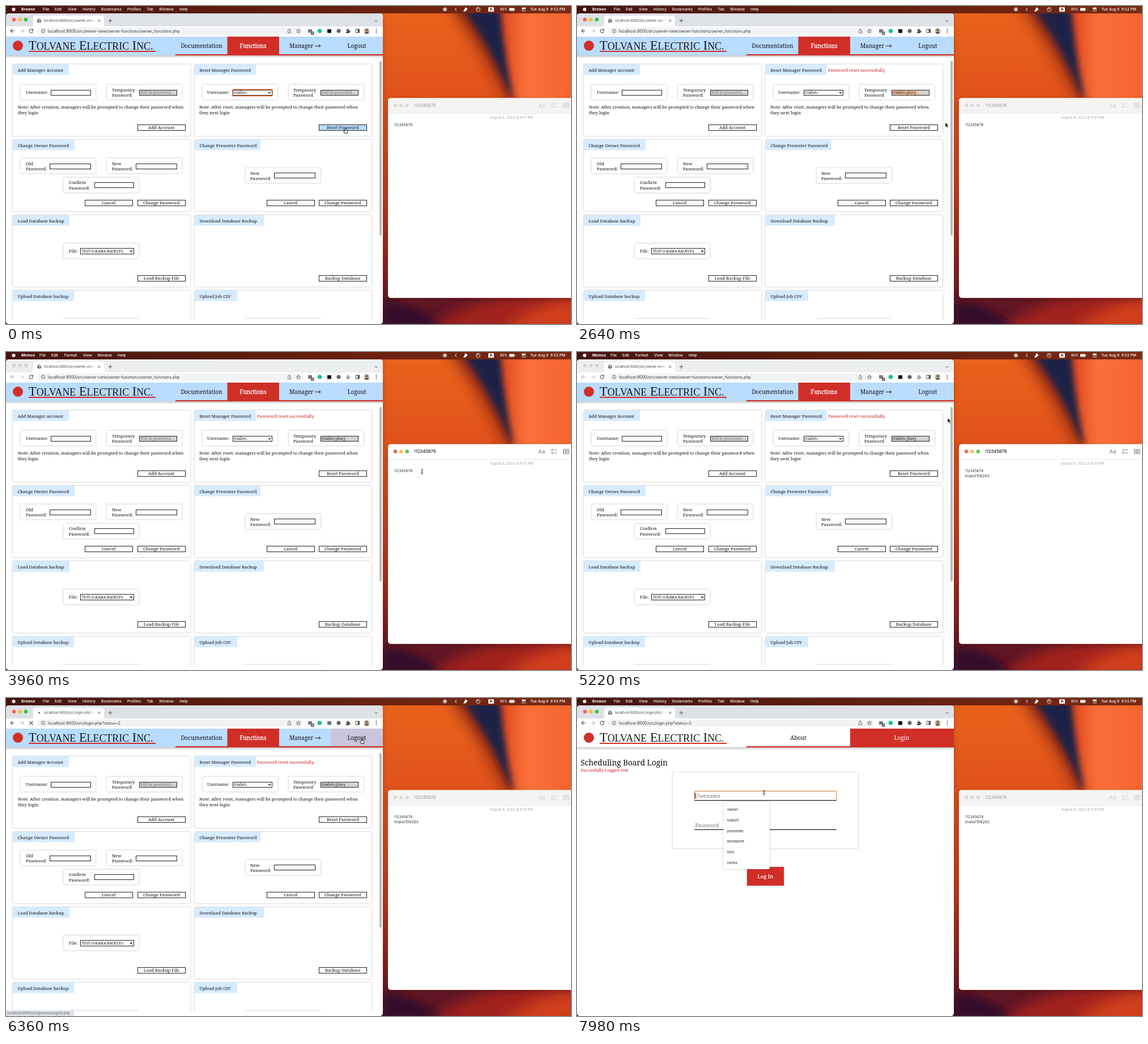
Write an HTML page that moves like this. It is 997 px wide and 561 px high and loops after 8 s.

```html
<!DOCTYPE html>
<html lang="en">
<head>
<meta charset="utf-8">
<title>Password reset</title>
<style>
html, body { margin: 0; width: 100%; height: 100%; overflow: hidden; background: #fff; }
svg { display: block; width: 997px; height: 561px; }
text { white-space: pre; }
.s { font-family: "Noto Serif", serif; font-variant-numeric: oldstyle-nums; }
.u { font-family: Inter, sans-serif; }
.t { font-family: "Liberation Serif", serif; }
</style>
</head>
<body>
<svg id="stage" viewBox="0 0 997 561" xmlns="http://www.w3.org/2000/svg"></svg>
<script>
const LOOP = 8000;
const RED = '#d02f27', SKY = '#b9dcff', INK = '#111';

const rect = (x, y, w, h, fill, more = '') =>
  `<rect x="${x}" y="${y}" width="${w}" height="${h}" fill="${fill}" ${more}/>`;
const dot = (x, y, r, fill, more = '') =>
  `<circle cx="${x}" cy="${y}" r="${r}" fill="${fill}" ${more}/>`;
const line = (d, color, w = 1, more = '') =>
  `<path d="${d}" fill="none" stroke="${color}" stroke-width="${w}" ${more}/>`;
const shape = (d, fill, more = '') => `<path d="${d}" fill="${fill}" ${more}/>`;
const text = (x, y, size, str, fill = INK, cls = 's', more = '') =>
  `<text class="${cls}" x="${x}" y="${y}" font-size="${size}" fill="${fill}" ${more}>${str}</text>`;
const mid = (x, y, size, str, fill = INK, more = '') =>
  text(x, y, size, str, fill, 's', `text-anchor="middle" ${more}`);
const ui = (x, y, size, str, fill = INK, more = '') => text(x, y, size, str, fill, 'u', more);
const group = (id, body, more = '') => `<g id="${id}" ${more}>${body}</g>`;

const defs = `<defs>
  <filter id="soft" x="-20%" y="-20%" width="140%" height="140%"><feDropShadow dx="0" dy="0" stdDeviation="1.7" flood-opacity=".3"/></filter>
  <filter id="win" x="-10%" y="-10%" width="120%" height="120%"><feDropShadow dx="0" dy="3" stdDeviation="5" flood-opacity=".22"/></filter>
  <filter id="b6" x="-50%" y="-50%" width="200%" height="200%"><feGaussianBlur stdDeviation="6"/></filter>
  <filter id="b12" x="-50%" y="-50%" width="200%" height="200%"><feGaussianBlur stdDeviation="12"/></filter>
  <linearGradient id="wall" x1="0" y1="0" x2="0" y2="1">
    <stop offset="0" stop-color="#ea641c"/><stop offset=".28" stop-color="#e0521a"/>
    <stop offset=".6" stop-color="#c53a1a"/><stop offset=".85" stop-color="#80201f"/><stop offset="1" stop-color="#4a1028"/>
  </linearGradient>
  <linearGradient id="petal" x1="0" y1="0" x2="1" y2="0">
    <stop offset="0" stop-color="#e0451c"/><stop offset=".35" stop-color="#f9713a"/><stop offset="1" stop-color="#f4622c"/>
  </linearGradient>
  <linearGradient id="bar"><stop offset="0" stop-color="#45140f"/><stop offset=".65" stop-color="#6b2210"/><stop offset="1" stop-color="#782a14"/></linearGradient>
  <linearGradient id="fade" x1="0" y1="0" x2="1" y2="0"><stop offset="0" stop-color="#fff" stop-opacity="0"/><stop offset="1" stop-color="#fff"/></linearGradient>
  <linearGradient id="drop" x1="0" y1="0" x2="0" y2="1"><stop offset="0" stop-opacity=".22"/><stop offset="1" stop-opacity="0"/></linearGradient>
  <clipPath id="page"><rect y="54" width="665" height="499"/></clipPath>
  <clipPath id="right"><rect x="655" y="0" width="342" height="561"/></clipPath>
</defs>`;

function wallpaper() {
  return rect(0, 0, 997, 561, '#5b1518') + `<g clip-path="url(#right)">` +
    rect(655, 0, 342, 561, 'url(#wall)') +
    shape('M775 -10Q845 80 885 170H930L905 -10Z', '#8a2719', 'filter="url(#b12)"') +
    shape('M795 -10Q850 60 888 150L905 165Q882 80 880 -10Z', '#1d2347', 'filter="url(#b6)"') +
    shape('M872 -10Q880 92 900 180H1010V-10Z', 'url(#petal)', 'filter="url(#b6)"') +
    shape('M735 575Q830 500 1010 500V575Z', '#a3231b', 'filter="url(#b12)"') +
    shape('M870 575Q930 525 1010 515V575Z', '#d2401c', 'filter="url(#b12)"') +
    shape('M668 520Q730 528 765 565H668Z', '#35102c', 'filter="url(#b6)"') + '</g>';
}

function menu(id, names, xs) {
  return group(id, names.map((n, i) =>
    ui(xs[i], 8.4, 6.7, n, '#fff', `font-weight="${i ? 500 : 700}"`)).join(''));
}

function menuBar() {
  return rect(0, 0, 997, 13, 'url(#bar)') + dot(13.5, 6, 3, '#fff') +
    menu('menuWeb', ['Browse', 'File', 'Edit', 'View', 'History', 'Bookmarks', 'Profiles', 'Tab', 'Window', 'Help'],
      [27, 65, 86, 109, 135, 168, 214, 248, 270, 306]) +
    menu('menuMemo', ['Memos', 'File', 'Edit', 'Format', 'View', 'Window', 'Help'], [27, 59, 80, 103, 136, 161, 197]) +
    dot(774.5, 6, 3, 'none', 'stroke="#fff"') + rect(773, 4.5, 3, 3, '#fff') +
    line('M795 3L792.500 6L795 9', '#fff') +
    shape('M811 2L815 6L813 6.500L811.500 9L807 10L809 5.500Z', '#fff') +
    dot(833, 6, 3.5, 'none', 'stroke="#fff" stroke-width=".8"') + line('M831 4L833 6V3', '#fff', .8) +
    rect(851, 2, 10, 8, '#fff', 'rx="1.5"') + ui(853.7, 8.4, 6.5, 'A', '#4b1214', 'font-weight="700"') +
    ui(872, 8.2, 5.6, '80%', '#fff', 'font-weight="500"') +
    rect(888, 3.5, 9, 5, '#fff', 'rx="1"') + line('M898.300 5V7', '#fff', .8) +
    rect(910, 2.8, 7, 2.8, '#fff', 'rx="1.4"') + rect(910.3, 6.8, 6.4, 2.4, 'none', 'rx="1.2" stroke="#fff" stroke-width=".6"') +
    ui(925, 8.4, 6.6, 'Tue Aug 8  9:52 PM', '#fff', 'font-weight="500"');
}

const lights = (x, y, gap, r, colors) => colors.map((c, i) => dot(x + i * gap, y, r, c)).join('');
const LIT = ['#ff5f57', '#febc2e', '#28c840'];
const LIT2 = ['#ed6a5e', '#f4bf50', '#61c554'];
const dim = c => [c, c, c];

function arrows(back, next) {
  const head = (x, d) => `M${x + 3.3 * d} 44H${x - 3.3 * d}M${x} 41L${x - 3.3 * d} 44L${x} 47`;
  return line(head(11.5, 1), back, 1.1) + line(head(28, -1), next, 1.1);
}

function toolbar() {
  const g = '#4e5256';
  return rect(0, 13, 665, 28, '#dee1e6', 'rx="5" id="strip"') +
    group('webOn', lights(14, 24, 10.5, 3.3, LIT)) + group('webOff', lights(14, 24, 10.5, 3.1, dim('#cfd1d4'))) +
    shape('M45 36Q48 36 48 32V21Q48 17 52 17H169Q173 17 173 21V32Q173 36 176 36Z', '#fff') +
    group('globe', dot(58.5, 26, 3.6, '#5f6368') + line('M55.500 25H58L59 27L58 29M59.500 23V25H62', '#fff', .9)) +
    group('load', dot(58.5, 26, 1.6, '#5f6368')) +
    group('tabA', ui(67, 28.2, 6, 'localhost:8000/src/owner-view', '#45494d')) +
    group('tabB', ui(67, 28.2, 6, 'localhost:8000/src/login.php?s', '#45494d')) +
    rect(144, 19, 14, 14, 'url(#fade)') + rect(158, 19, 12, 14, '#fff') +
    line('M162.500 24L166.500 28M166.500 24L162.500 28', g, .9) +
    line('M184 22.500V29.500M180.500 26H187.500', g) + line('M650.500 25L653 27.500L655.500 25', g) +
    rect(0, 36, 665, 18, '#fff') + rect(55, 38, 469, 12.5, '#f1f3f4', 'rx="6.2"') +
    group('navOn', arrows('#4e5256', '#bfc1c4')) + group('navOff', arrows('#b4b6b9', '#cfd1d4')) +
    group('reload', line('M47 42A3.300 3.300 0 1 0 47.500 45', g, 1.1) + shape('M48 40V43.500H44.500Z', g)) +
    group('stop', line('M41.500 41L47.500 47M47.500 41L41.500 47', g, 1.1)) +
    dot(65.5, 44, 3.2, 'none', `stroke="${g}" stroke-width=".8"`) + line('M65.500 43.500V46M65.500 42V42.800', g, .8) +
    group('urlA', ui(74, 46.5, 7, 'localhost:8000/src/owner-view/owner-functions/owner_functions.php', '#33363a')) +
    group('urlB', ui(74, 46.5, 7, 'localhost:8000/src/login.php?status=2', '#33363a')) +
    line('M498 43H497.500V47.500H502.500V43H502M500 45V40.500M498.300 42L500 40.300L501.700 42', g, .8) +
    shape('M516 40.500L517 43H519.700L517.600 44.700L518.400 47.300L516 45.800L513.600 47.300L514.400 44.700L512.300 43H515Z', 'none', `stroke="${g}" stroke-width=".8"`) +
    rect(533, 41, 7, 6, '#77797c') + rect(538, 45, 5.5, 6, '#5b5e62', 'rx="1"') + ui(539.2, 50, 5, '8', '#fff') +
    dot(553.5, 44, 3.8, '#15c39a') + rect(567, 41, 7, 6.5, '#111', 'id="ext"') +
    dot(587, 44, 3.5, '#5f6368') +
    shape('M600 42H602Q601.500 40 603 40Q604.500 40 604 42H606V44Q608 43.500 608 45Q608 46.500 606 46V48H600V45.500Q602 45.500 602 44.500Q602 43.500 600 43.500Z', g, 'id="puzzle"') +
    rect(617, 41, 6.5, 6, 'none', `stroke="${g}"`) + rect(620.5, 41, 3, 6, g) +
    dot(636.5, 44, 5.2, '#c9b8a4') + dot(636.5, 42.5, 2, '#6b5444') + shape('M632.500 47.500Q636.500 43 640.500 47.500Q636.500 50.500 632.500 47.500Z', '#6b5444') +
    [41, 44, 47].map(y => dot(653.5, y, .9, g)).join('');
}

function brand() {
  const big = 22.4, sm = 17.9;
  const word = (a, b) => `<tspan font-size="${big}">${a}</tspan><tspan font-size="${sm}">${b}</tspan>`;
  return dot(21, 70, 9, RED) + rect(40, 79, 224, 2, RED) +
    text(40, 76.8, big, word('T', 'OLVANE') + word(' E', 'LECTRIC') + word(' I', 'NC.'), '#15171c', 't');
}

const box = (x, y, w = 132, h = 26) => rect(x, y, w, h, '#fff', 'filter="url(#soft)"');
const field = (x, y, w, fill = '#fff', h = 9) => rect(x + .5, y + .5, w - 1, h, fill, 'stroke="#222" stroke-width="1"');
const button = (x, y, label, id = '') =>
  rect(x + .5, y + .5, 84, 10, '#fff', `stroke="#222" stroke-width="1" ${id && `id="${id}"`}`) + mid(x + 42.3, y + 8.4, 7.7, label);
const two = (x, y, a, b) => text(x, y, 7.64, a) + text(x, y + 9.5, 7.64, b);
const chevron = (x, y) => line(`M${x - 2} ${y - 1}L${x} ${y + 1}L${x + 2} ${y - 1}`, INK, 1.2);
const card = (x, y, w, title) => rect(x, y, x < 100 ? 313 : 312, 126, '#fff', 'filter="url(#soft)"') +
  rect(x, y, w, 18.5, '#d6ebff') + text(x + 8.5, y + 12.7, 7.64, title);

function note(x, when, next) {
  return text(x, 180.5, 7.64, `Note: After ${when}, managers will be prompted to change their password when`) +
    text(x, 190.5, 7.64, next);
}

function boardPage() {
  const ghost = x => field(x, 148, 67, '#d3d3d3') + text(x + 2, 155.2, 6.3, 'Will be generated...', '#777');
  const cards =
    card(12, 103, 99, 'Add Manager Account') + card(333, 103, 108, 'Reset Manager Password') +
    card(12, 236, 109, 'Change Owner Password') + card(333, 236, 116, 'Change Presenter Password') +
    card(12, 369, 100, 'Load Database backup') + card(333, 369, 122, 'Download Database Backup') +
    card(12, 502, 108, 'Upload Database backup') + card(333, 502, 75, 'Upload Job CSV') +
    box(26, 139) + box(178, 139) + box(347, 139) + box(499, 139) +
    box(26, 269) + box(178, 269) + box(102, 303) + box(423, 286) + box(102, 419) + box(102, 552) + box(423, 552);
  const forms =
    text(35, 155.4, 7.64, 'Username:') + field(79, 148, 71) + two(187, 150.5, 'Temporary', 'Password') + ghost(235) +
    note(21, 'creation', 'they login') + button(232, 209, 'Add Account') +
    text(355, 155.4, 7.64, 'Username:') + field(400, 148, 70) + text(402, 155.2, 6.3, 'trialist1') + chevron(465, 153) +
    group('ring', rect(400, 147.5, 70, 11, 'none', 'rx="1" stroke="#e0532b" stroke-width="1.3"')) +
    two(507, 150.5, 'Temporary', 'Password') + ghost(555) +
    group('made', rect(556, 149, 65, 8, '#d3d3d3') + rect(556.5, 149, 46.5, 8, '#f6c199', 'id="mark"') + text(557, 155.3, 6.3, 'trialist158203')) +
    group('done', text(443, 115.7, 7.64, 'Password reset successfully.', '#c81e1e')) +
    note(341, 'reset', 'they next login') + button(552, 209, 'Reset Password', 'reset') +
    two(35, 280.5, 'Old', 'Password:') + field(77, 278, 73) + two(187, 280.5, 'New', 'Password:') + field(229, 278, 73) +
    two(111, 314, 'Confirm', 'Password:') + field(156, 311, 70) +
    button(139, 342, 'Cancel') + button(232, 342, 'Change Password') +
    two(431, 297.5, 'New', 'Password:') + field(473, 294, 73) +
    button(460, 342, 'Cancel') + button(552, 342, 'Change Password') +
    text(111, 435.3, 7.64, 'File:') + field(131, 427, 95, '#fff', 10) + text(134, 434.8, 6.3, 'TEST-O-RAMA-BACKUP.s') +
    rect(217, 428, 8, 9, '#fff') + chevron(221, 432.5) +
    button(232, 475, 'Load Backup File') + button(552, 475, 'Backup Database');
  return cards + forms + rect(659, 97, 4, 308, '#b9b9b9', 'rx="2"') +
    rect(0, 87, 665, 5, 'url(#drop)') + rect(0, 54, 665, 33, SKY) +
    rect(573.5, 54, 91.5, 31, '#cac4dc', 'id="out"') + rect(299, 85, 366, 2.2, RED) + rect(390.5, 54, 91.5, 33, RED) +
    brand() + mid(345, 74, 9.95, 'Documentation') + mid(436, 74, 9.95, 'Functions', '#fff', 'stroke="#fff" stroke-width=".3"') +
    text(500, 74, 9.95, 'Manager') + line('M545 70.500H555M552 68L555 70.500L552 73', INK, .9) + mid(619, 74, 9.95, 'Logout');
}

function loginPage() {
  const names = ['owner', 'trialist1', 'presenter', 'testowner', 'tolvi', 'nerba'];
  return rect(0, 87, 665, 5, 'url(#drop)') + rect(0, 54, 665, 33, '#fff') + brand() +
    rect(299, 85, 183, 2.2, RED) + rect(482, 54, 183, 33, RED) +
    mid(390.5, 74, 9.95, 'About') + mid(573, 74, 9.95, 'Login', '#fff') +
    text(6.5, 118.8, 13.5, 'Scheduling Board Login') + text(6.5, 129.8, 7.64, 'Succesfully Logged Out', '#c81e1e') +
    box(169, 131.5, 327, 133.5) + text(208.5, 175.5, 9.15, 'Username', '#757575') + text(208.5, 227.5, 9.15, 'Password', '#757575') +
    rect(207, 180, 251, 1.3, '#222') + rect(207, 231.5, 251, 1.3, '#222') +
    rect(300, 298, 65, 33, RED, 'filter="url(#soft)"') + mid(332.3, 318, 9.2, 'Log In', '#fff', 'stroke="#fff" stroke-width=".2"') +
    group('focus', rect(207.3, 164.3, 250.4, 16.2, 'none', 'rx="1.5" stroke="#e08a50" stroke-width="1.2"') +
      rect(208, 180, 249, 1, '#222') + rect(208.2, 167, .8, 11, '#111') +
      rect(258.5, 183.5, 81.5, 118.5, '#fff', 'rx="2" filter="url(#soft)"') +
      names.map((n, i) => ui(265, 199.2 + i * 18.7, 6.4, n, '#222')).join(''));
}

function memoIcons(c) {
  return ui(939.5, 178.8, 9.3, 'Aa', c) +
    dot(964, 172.8, 1.5, 'none', `stroke="${c}" stroke-width=".8"`) + dot(964, 178, 1.5, 'none', `stroke="${c}" stroke-width=".8"`) +
    line('M967 172.800H972M967 178H972', c, .9) +
    rect(983.5, 171.8, 9.5, 7.5, 'none', `stroke="${c}" stroke-width=".9"`) + line('M983.500 174.300H993M983.500 176.800H993M988.200 171.800V179.300', c, .8);
}

function memoWindow() {
  const title = c => ui(720.5, 178.3, 7.4, '!12345678', c, 'font-weight="600"');
  return rect(674, 162.5, 340, 352.5, '#fff', 'rx="5" filter="url(#win)"') +
    group('memoOn', lights(687, 175.5, 10.4, 3.3, LIT2) + title('#333') + memoIcons('#777')) +
    group('memoOff', shape('M674 189.500V167.500Q674 162.500 679 162.500H997V189.500Z', '#f4f4f3') +
      lights(687, 175.5, 10.4, 3.1, dim('#d9d9d9')) + title('#aaa') + memoIcons('#ccc')) +
    rect(674, 189, 323, .8, '#e3e3e3') + ui(854, 199.3, 6.1, 'August 8, 2023 at 9:51 PM', '#a5a5a5') +
    ui(685, 212.4, 6.5, '!12345678', '#333') + group('paste', ui(685, 221.4, 6.8, 'trialist158203', '#333'));
}

function pointers() {
  const edge = 'stroke="#fff" stroke-width=".7"';
  return group('arrow', shape('M-1 -4V5L1 3.200L2.300 6L3.700 5.400L2.500 2.700H5Z', '#000', edge)) +
    group('hand', shape('M-1 -4Q0 -5 .8 -4V-1L3.500 0Q4.300 .3 4 2L3.300 4.500H-1.200L-3.500 1Q-3 -.3 -1 .8Z', '#fff', 'stroke="#000" stroke-width=".9"')) +
    group('beam', line('M-1.800 -4Q0 -4 0 -2.800Q0 -4 1.800 -4M0 -3V3M-1.800 4Q0 4 0 2.800Q0 4 1.800 4M-1 .8H1', '#222', .9));
}

const stage = document.getElementById('stage');
stage.innerHTML = defs + wallpaper() + menuBar() + memoWindow() +
  rect(0, 13, 665, 548, '#fff', 'rx="5" filter="url(#win)"') +
  `<g clip-path="url(#page)">${group('board', boardPage())}${group('login', loginPage())}</g>` + toolbar() +
  group('status', rect(0, 551, 120, 10, '#dee1e6', 'rx="1.5"') + ui(2, 558, 6, 'localhost:8000/src/processLogout.php', '#5f6368')) +
  group('cursor', pointers());

const el = {};
stage.querySelectorAll('[id]').forEach(n => el[n.id] = n);
const show = (id, on) => el[id].setAttribute('visibility', on ? 'inherit' : 'hidden');
const either = (on, a, b) => { show(a, on); show(b, !on); };

// Cursor stops: time, x, y
const path = [[0, 599, 220], [950, 599, 220], [1520, 606, 153], [2280, 606, 153], [2640, 651, 209], [3050, 734, 211],
  [4850, 734, 211], [5220, 655, 120], [5720, 628, 76], [6800, 628, 76], [7400, 330, 167], [LOOP, 330, 167]];

function cursorAt(t) {
  const i = path.findIndex((p, k) => k && t <= p[0]);
  const [t0, x0, y0] = path[i - 1], [t1, x1, y1] = path[i];
  const u = (t - t0) / (t1 - t0), e = u * u * (3 - 2 * u);
  return [x0 + (x1 - x0) * e, y0 + (y1 - y0) * e];
}

function draw(t) {
  const [x, y] = cursorAt(t);
  const over = (l, top, r, b) => x >= l && x <= r && y >= top && y <= b;
  const isReset = t >= 880, memo = t >= 3400 && t < 6150;
  const left = t >= 6280, isLogin = t >= 6750;
  const busy = (t >= 620 && t < 880) || (left && !isLogin);

  either(memo, 'menuMemo', 'menuWeb');
  either(memo, 'memoOn', 'memoOff');
  either(memo, 'webOff', 'webOn');
  either(memo, 'navOff', 'navOn');
  el.strip.setAttribute('fill', memo ? '#eceef0' : '#dee1e6');
  el.puzzle.setAttribute('fill', memo ? '#a5a7aa' : '#4e5256');
  el.ext.setAttribute('fill', left && !isLogin ? '#77797c' : '#111');
  either(busy, 'stop', 'reload');
  either(busy, 'load', 'globe');
  either(left, 'tabB', 'tabA');
  either(left, 'urlB', 'urlA');
  either(isLogin, 'login', 'board');

  show('ring', !isReset && !isLogin);
  show('made', isReset && !isLogin);
  show('done', isReset && !isLogin);
  show('mark', t >= 1850 && !memo && !left);
  show('paste', t >= 4450);
  show('focus', isLogin && t >= 7560);

  const onReset = !isLogin && over(552, 209, 636, 221);
  const onLogout = !isLogin && over(573, 54, 665, 87);
  const onText = (!isLogin && over(555, 148, 622, 158)) || over(682, 190, 997, 515) || (isLogin && over(207, 164, 458, 181));
  el.reset.setAttribute('fill', onReset ? SKY : '#fff');
  show('out', onLogout && !memo);
  show('status', onLogout && !memo);
  show('hand', onReset || onLogout);
  show('beam', onText);
  show('arrow', !(onReset || onLogout || onText));
  el.cursor.setAttribute('transform', `translate(${x.toFixed(2)} ${y.toFixed(2)})`);
}

const start = performance.now();
function tick() {
  draw((performance.now() - start) % LOOP);
  requestAnimationFrame(tick);
}
tick();
</script>
</body>
</html>
```
